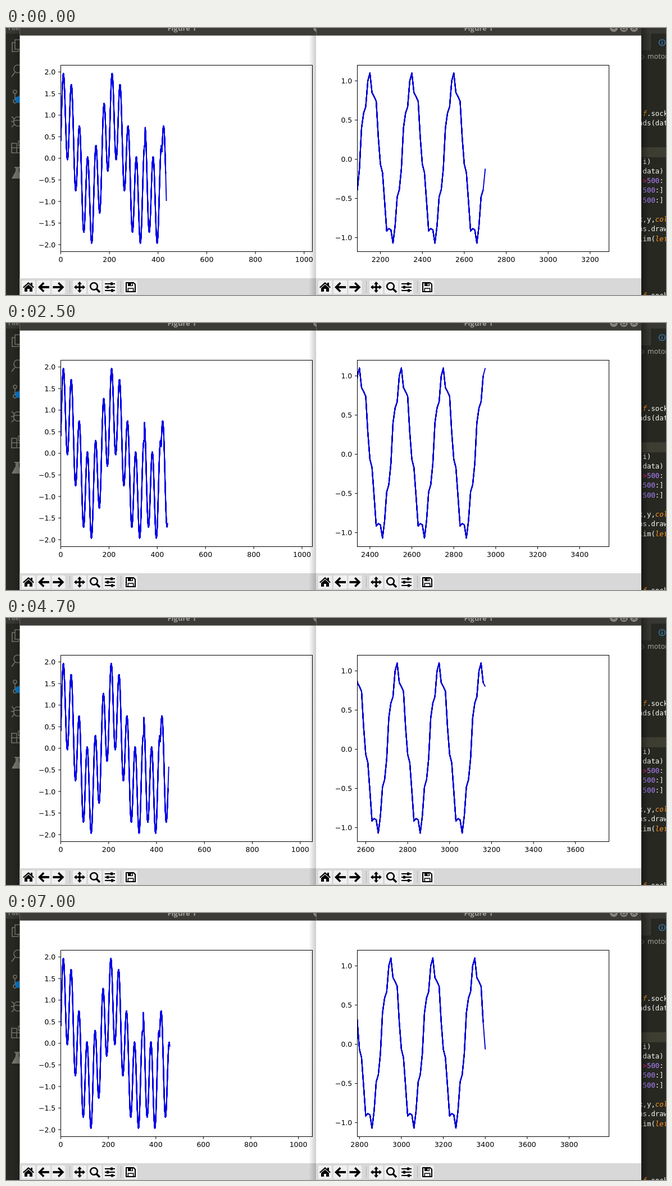
Animation of 1175x477 px, one loop 7100 ms. Source, as an HTML page:

```html
<!DOCTYPE html>
<html lang="en">
<head>
<meta charset="utf-8">
<title>Live plots</title>
<style>
html, body { margin: 0; width: 100%; height: 100%; overflow: hidden; background: #272822; }
svg { display: block; width: 1175px; height: 477px; }
.tick { font: 12.5px "DejaVu Sans", sans-serif; fill: #000; }
.code { font: 12.4px "DejaVu Sans Mono", monospace; fill: #f8f8f2; white-space: pre; }
.ui { font: 12.5px "Noto Sans", sans-serif; fill: #a3a39b; }
.title { font: bold 13px "Open Sans", sans-serif; fill: #a19f99; text-anchor: middle; }
.o { fill: #fd971f; font-style: italic; }
.p { fill: #ae81ff; }
.r { fill: #f92672; }
.axis { fill: none; stroke: #000; stroke-width: 1; }
.curve { fill: none; stroke-width: 1.9; stroke-linejoin: round; }
.body { filter: url(#overdraw); }
</style>
</head>
<body>
<svg id="stage" viewBox="0 0 1175 477">
  <defs>
    <linearGradient id="shade"><stop offset="0" stop-color="#000" stop-opacity="0"/><stop offset="1" stop-color="#000" stop-opacity=".2"/></linearGradient>
    <linearGradient id="shadeOut"><stop offset="0" stop-color="#000" stop-opacity=".35"/><stop offset="1" stop-color="#000" stop-opacity="0"/></linearGradient>
    <clipPath id="plot"><rect x="97.5" y="66.5" width="448" height="333"/></clipPath>
    <!-- hardens edges like a line plotted over itself many times -->
    <filter id="overdraw" filterUnits="userSpaceOnUse" x="90" y="60" width="465" height="345" color-interpolation-filters="sRGB">
      <feComponentTransfer><feFuncA type="linear" slope="4"/></feComponentTransfer>
    </filter>
  </defs>
  <g id="editor"></g>
  <g id="left"></g>
  <rect x="539" y="13" width="13" height="464" fill="url(#shade)"/>
  <g id="right" transform="translate(528 0)"></g>
</svg>
<script>
const $ = id => document.getElementById(id);
const LOOP = 7100, X0 = 97.5, W = 448, TOP = 66.5, BOTTOM = 399.5;

function editor() {
  const lines = [
    [157, '<tspan class="o">lf</tspan>.sock'],
    [174, 'ads(dat'],
    [243, ' i)'],
    [260, ' data)'],
    [277, ' <tspan class="r">&gt;</tspan><tspan class="p">500</tspan>:'],
    [294, ' <tspan class="p">500</tspan>:]'],
    [312, ' <tspan class="p">500</tspan>:]'],
    [346, 'x,y,<tspan class="o">col</tspan>'],
    [363, 'ns.draw'],
    [381, 'lim(<tspan class="o">lef</tspan>'],
    [482, '<tspan class="o">lf</tspan>.sock']
  ];
  return `<rect width="1175" height="477" fill="#272822"/>
    <rect width="1175" height="10" fill="#383733"/>
    <rect x="1131" y="10" width="44" height="30" fill="#1e1f1c"/>
    <rect x="1131" y="10" width="18" height="30" fill="#34352f"/>
    <rect x="1150" y="10" width="25" height="30" fill="#272822"/>
    <circle cx="1168" cy="26" r="5.5" fill="none" stroke="#3a8fd0" stroke-width="1.2"/>
    <path d="M1168 25v4M1168 22.5v1.3" stroke="#3a8fd0" stroke-width="1.4"/>
    <path d="M1132 47.5l4 4-4 4" fill="none" stroke="#8a8a82"/>
    <text class="ui" x="1142" y="55">motorbox</text>
    <rect x="1131" y="213" width="44" height="18" fill="#3e3d32"/>
    ${lines.map(([y, s]) => `<text class="code" x="1126" y="${y}">${s}</text>`).join('')}
    <rect x="1131" y="0" width="14" height="477" fill="url(#shadeOut)"/>
    <text class="ui" x="4" y="4">File</text>
    <g fill="none" stroke="#77786f" stroke-width="1.5">
      <path d="M16 21h10v17H16zM16 26h-5v16h11v-4"/>
      <circle cx="21" cy="73" r="7"/><path d="M16 79l-6 8"/>
      <circle cx="16" cy="114" r="3"/><circle cx="16" cy="131" r="3"/><path d="M16 117v11M16 125q8 0 9-5"/>
      <path d="M14 163q7-9 14 0v8q-7 9-14 0zM10 158l5 5M9 167h6M10 177l5-5M14 165h12"/>
      <path d="M10 206h9v17h-9zM10 214h18v9H10M22 202h8v8h-8z"/>
    </g>
    <path d="M15 248h10v2h-2v6l5 13H10l7-13v-6h-2z" fill="#77786f"/>
    <circle cx="22" cy="128" r="6" fill="#0a7acc"/>
    <rect x="12" y="0" width="13" height="477" fill="url(#shade)"/>`;
}

const ICONS = [
  [40, '<path d="M-10 0L0-9 4-5.5V-8h3v5.2L10 0 8.5 1.5 0-6-8.5 1.5zM-7 1.5L0-4.500 7 1.5V8H2V3h-4v5h-5z"/>'],
  [67, '<path d="M-10 0L-1-9 1.5-6.5-3-2H10V2H-3L1.5 6.5-1 9z"/>'],
  [93.5, '<path d="M10 0L1-9-1.5-6.5 3-2H-10V2H3L-1.5 6.5 1 9z"/>'],
  [131, '<path d="M0-10l4 4.500H1.5v4h4V-4L10 0 5.5 4V1.500h-4v4H4L0 10-4 5.500h2.500v-4h-4V4L-10 0l4.500-4v2.500h4v-4H-4z"/>'],
  [158, '<circle cx="-1.5" cy="-1.5" r="6.3" fill="none" stroke="#000" stroke-width="2.6"/><path d="M3 3l6 6" stroke="#000" stroke-width="3.6"/>'],
  [185, '<path d="M-9-6H9M-9 0H9M-9 6H9" stroke="#000" stroke-width="1.8"/><path d="M1-8.500h4v5H1zM-6-2.500h4v5h-4zM2 3.500h4v5H2z"/>'],
  [222, '<path d="M-8-8H5L8-5V8H-8z" fill="none" stroke="#000" stroke-width="2"/><path d="M-5-8H4v6H-5zM-5.500 1.500h11V8h-11z"/><path d="M.5-6.500h2v3.500h-2zM-4 3h8v4h-8z" fill="#f0f0f0"/>']
];

function frame(yTicks, unit, zero) {
  const ticks = yTicks.map(v => {
    const y = zero - v * unit, label = v.toFixed(1).replace('-', '−');
    return `<path class="axis" d="M${X0} ${y}h-4.4"/><text class="tick" x="${X0 - 9.2}" y="${y + 4.6}" text-anchor="end">${label}</text>`;
  }).join('');
  const buttons = [554, 572, 590].map((x, i) =>
    `<circle cx="${x}" cy="0" r="7" fill="#85837c"/><path d="${['M-3 1h6', 'M-3-3h6v6h-6z', 'M-3-3l6 6M3-3l-6 6'][i]}" transform="translate(${x} 0)" fill="none" stroke="#3c3b37" stroke-width="1.4"/>`).join('');
  const icons = ICONS.map(([x, s]) =>
    `<g transform="translate(${x} 463)"><rect x="-12" y="-12" width="24" height="24" rx="2" fill="#f0f0f0"/>${s}</g>`).join('');
  return `<rect x="24.5" width="578.5" height="477" fill="#fff"/>
    <rect x="24.5" width="578.5" height="13.5" fill="#3c3b37"/>
    <text class="title" x="313" y="4.5">Figure 1</text>${buttons}
    <rect x="24.5" y="447" width="578.5" height="30" fill="#d8d8d8"/>${icons}
    <path d="M113.5 452v21M204.5 452v21" stroke="#b4b4b4"/>
    <g clip-path="url(#plot)"><path class="curve body"/><path class="curve tail"/></g>
    <rect class="axis" x="${X0}" y="${TOP}" width="${W}" height="${BOTTOM - TOP}"/>
    ${ticks}<g class="xticks"></g>`;
}

function makePlot(id, o) {
  const root = $(id);
  root.innerHTML = frame(o.ticks, o.unit, o.zero);
  const body = root.querySelector('.body'), tail = root.querySelector('.tail');
  const xticks = root.querySelector('.xticks');
  body.setAttribute('stroke', o.color);
  tail.setAttribute('stroke', o.color);
  return (from, to, first, last) => {
    const px = x => X0 + (x - from) / (to - from) * W;
    const line = (a, b) => {
      let d = '';
      for (let x = a; x <= b; x += o.step)
        d += (d ? 'L' : 'M') + px(x).toFixed(2) + ' ' + (o.zero - o.f(x) * o.unit).toFixed(2);
      return d;
    };
    const cut = last - o.step * o.thin;
    body.setAttribute('d', line(first, cut));
    tail.setAttribute('d', line(cut, last));
    let s = '';
    for (let x = Math.ceil(from / 200) * 200; x <= to; x += 200)
      s += `<path class="axis" d="M${px(x)} ${BOTTOM}v4.4"/><text class="tick" x="${px(x)}" y="418.3" text-anchor="middle">${x}</text>`;
    xticks.innerHTML = s;
  };
}

// Two sines whose phase jumps back twice.
function beat(x) {
  const u = (x + (x < 347 ? 31 : x < 416 ? -38 : -115)) * Math.PI / 100;
  return Math.sin(u) + Math.sin(6 * u);
}

const WAVE = [-.065, -.17, -.535, -.915, -.885, -.9, -1.07, -.85, -.48, -.39,
  -.12, .4, .59, .67, 1, 1.1, .85, .8, .74, .28];
const wave = x => WAVE[x / 10 % 20];

$('editor').innerHTML = editor();
const drawLeft = makePlot('left', {
  ticks: [-2, -1.5, -1, -.5, 0, .5, 1, 1.5, 2], unit: 77.1, zero: 232.8,
  f: beat, step: 1, thin: 3, color: '#0000e6'
});
const drawRight = makePlot('right', {
  ticks: [-1, -.5, 0, .5, 1], unit: 140, zero: 234.5,
  f: wave, step: 10, thin: 1, color: '#0000d2'
});

// Steps where the whole screen stalls, and where only the right plot lags.
const STALL = new Set([2, 5, 9, 16, 19, 29, 39, 48, 63]);
const LAG = new Set([27, 41, 42]);
let shown = -1;

function render(time) {
  let k = Math.floor(time % LOOP / 100);
  if (STALL.has(k)) k--;
  if (k === shown) return;
  shown = k;
  const a = 434 + Math.floor((k * 100 + 120) / 280);
  drawLeft(0, a + 600, 0, a);
  const b = 2700 + 10 * (LAG.has(k) ? k - 1 : k);
  drawRight(b - 610, b + 590, b - 620, b);
}

const start = performance.now();
function loop() {
  render(performance.now() - start);
  requestAnimationFrame(loop);
}
loop();
</script>
</body>
</html>
```
